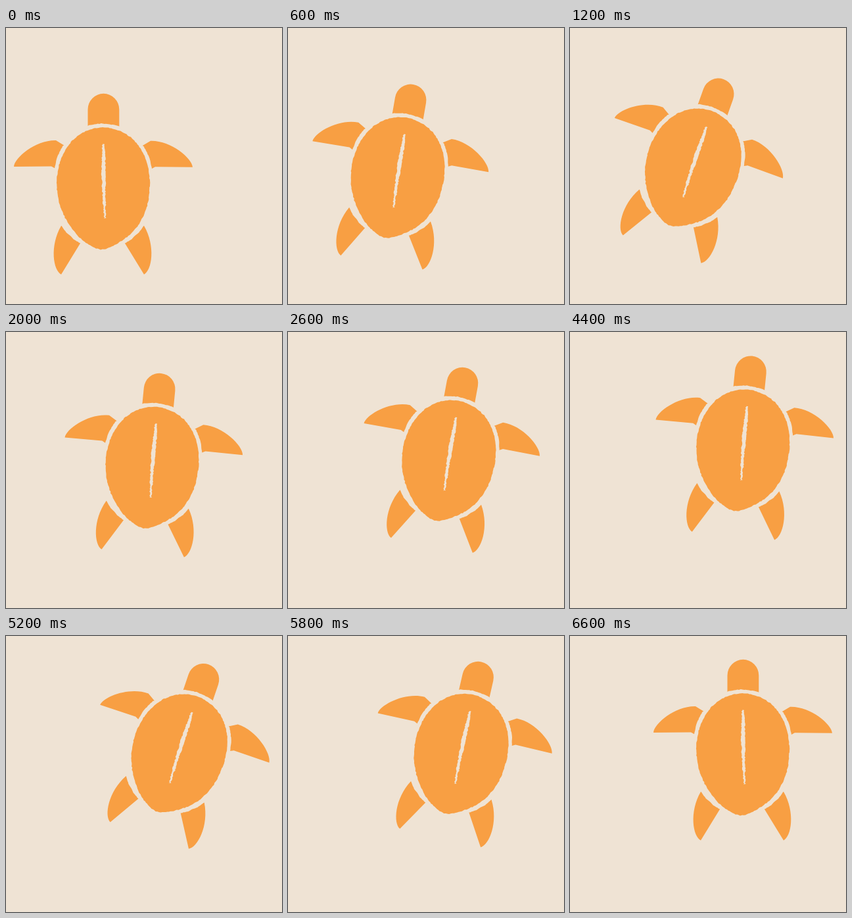
Write an HTML page that moves like this. It is 420 px wide and 420 px high and loops after 8 s.

```html
<!DOCTYPE html>
<html lang="en">
<head>
<meta charset="utf-8">
<title>Swimming turtle</title>
<style>
  html, body { margin: 0; width: 100%; height: 100%; overflow: hidden; background: #efe3d4; }
  svg { display: block; width: 100vw; height: 100vh; }
  #turtle { fill: #f89f43; }
  #slit { fill: #efe3d4; }
</style>
</head>
<body>
<svg viewBox="0 0 420 420">
  <g id="turtle"></g>
</svg>
<script>
const LOOP = 8000, STEP = 200, END = 6600;
const SVG = 'http://www.w3.org/2000/svg';

// Waypoints: time, x, y
const ROUTE = [[0, 148, 239], [1200, 186.6, 208.9], [2000, 222.2, 201.4], [2400, 238, 195.6], [3400, 263, 175]];
// Turning points of the sway: time, degrees
const SWAY = [[0, 0], [1200, 19.6], [2200, 4], [2900, 14.4], [4030, 2.5], [5300, 19], [6600, 0]];

let seed = 7;
function rand() {
  seed = (seed * 16807) % 2147483647;
  return seed / 2147483647;
}
const jitter = amp => (rand() * 2 - 1) * amp;

// Index of the segment holding t, and the share of it passed
function locate(keys, t) {
  let i = 0;
  while (i < keys.length - 2 && t >= keys[i + 1][0]) i++;
  return [i, Math.min(1, (t - keys[i][0]) / (keys[i + 1][0] - keys[i][0]))];
}

function angle(t) {
  const [i, u] = locate(SWAY, t);
  const from = SWAY[i][1], to = SWAY[i + 1][1];
  return from + (to - from) * (1 - Math.cos(Math.PI * u)) / 2;
}

// Smooth curve through the waypoints, at rest at the end
function place(t, axis) {
  const [i, u] = locate(ROUTE, t), v = 1 - u;
  const a = ROUTE[i], b = ROUTE[i + 1], d = b[0] - a[0];
  const slope = n => {
    if (n === ROUTE.length - 1) return 0;
    const p = ROUTE[Math.max(0, n - 1)], q = ROUTE[n + 1];
    return (q[axis] - p[axis]) / (q[0] - p[0]);
  };
  return a[axis] * (1 + 2 * u) * v * v + slope(i) * d * u * v * v +
    b[axis] * u * u * (3 - 2 * u) - slope(i + 1) * d * u * u * v;
}

function makePath(d) {
  const path = document.createElementNS(SVG, 'path');
  path.setAttribute('d', d);
  return path;
}

// Grainy points along a path, to follow an M or L
function rough(d, amp, gap = 2.5) {
  const path = makePath(d), length = path.getTotalLength();
  const count = Math.round(length / gap);
  return Array.from({ length: count + 1 }, (_, k) => {
    const p = path.getPointAtLength(length * k / count);
    return `${(p.x + jitter(amp)).toFixed(1)} ${(p.y + jitter(amp)).toFixed(1)}`;
  }).join(' L');
}

const turtle = document.getElementById('turtle');
function add(d, attrs = {}) {
  const path = makePath(d);
  for (const name in attrs) path.setAttribute(name, attrs[name]);
  turtle.append(path);
}
const mirror = (width, dy = 0) => ({ transform: `translate(${width} ${dy}) scale(-1 1)` });

const head = `M172.3 150 V124 A23.9 24.2 0 0 0 124.5 124 V149
  L${rough('M124.5 148.7 Q148 142 172.3 149.7', 0.6)}Z`;
const flipper = `M12 211 C13 197 46 170 76 171
  L${rough('M88 178 Q77 193 74 213', 0.5)} L69 210.6Z`;
const leg = `M84 375 C72 369 66 332 84 301
  L${rough('M84 301 Q96 318 113.5 328', 0.5)}Z`;
const shell = `M${rough(`M148 151.5 C189 151.5 218.8 187 218.8 237
  C218.8 288 196 315 160 333 Q152 337 145 337 Q138 336.5 132 333
  C108 322 77.3 285 77.3 237 C77.3 187 107 151.5 148 151.5`, 0.5)}Z`;
const slit = `M${rough(`M147 177 L150 176 C152 210 151 260 152 289
  L149.5 291 C147 260 143.5 215 147 177`, 0.9, 2)}Z`;

add(head);
add(flipper);
add(flipper, mirror(296, 0.7));
add(leg);
add(leg, mirror(294));
add(shell);
add(slit, { id: 'slit' });

const start = performance.now();
function draw() {
  const now = (performance.now() - start) % LOOP;
  const t = Math.min(END, Math.floor(now / STEP) * STEP);
  turtle.setAttribute('transform',
    `translate(${place(t, 1)} ${place(t, 2)}) rotate(${angle(t)}) translate(-148 -239)`);
  requestAnimationFrame(draw);
}
draw();
</script>
</body>
</html>
```
